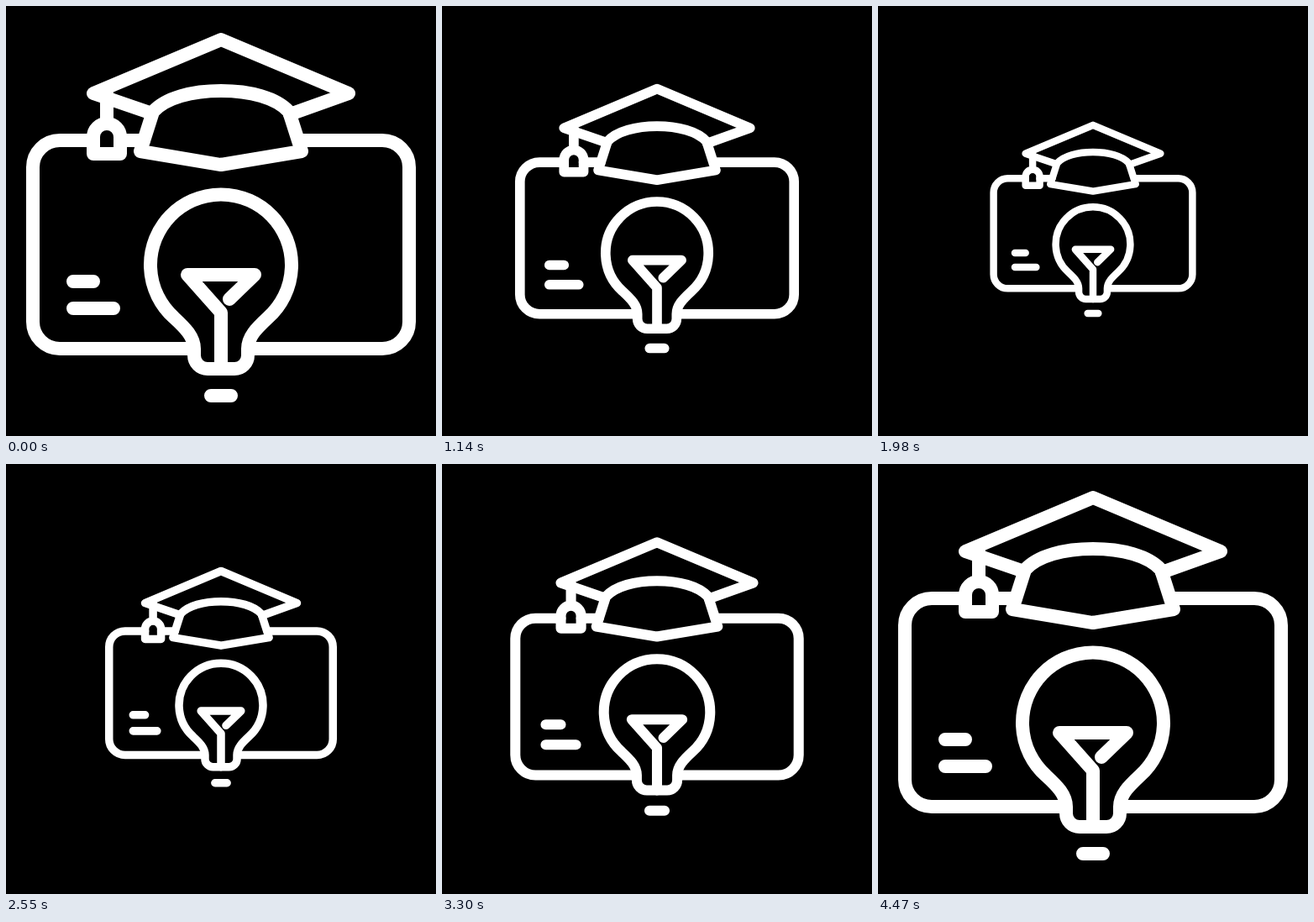
These frames come from a looping animation (512 px wide and 512 px high, 4.5 s). An HTML page:

```html
<!DOCTYPE html>
<html lang="en">
<head>
<meta charset="utf-8">
<title>Learning icon</title>
<style>
  html, body { margin: 0; width: 100%; height: 100%; overflow: hidden; background: #000; }
  svg { display: block; width: 100%; height: 100%; }
</style>
</head>
<body>
<svg viewBox="0 0 512 512">
  <g id="icon" fill="none" stroke="#fff" stroke-width="16" stroke-linecap="round" stroke-linejoin="round">
    <!-- card -->
    <path d="M104 160H64A32 32 0 0 0 32 192V376A32 32 0 0 0 64 408H224M288 408H448A32 32 0 0 0 480 376V192A32 32 0 0 0 448 160H349M136 160H164"/>
    <path d="M80 328H104M80 360H128"/>
    <!-- cap -->
    <path d="M174 128L104 104L256 40L408 104L338 129"/>
    <path d="M160 173L175 126C190 109 222 101 256 101S322 109 337 126L352 173L256 189Z"/>
    <!-- tassel -->
    <path d="M120 104V140M104 176V156A16 16 0 0 1 136 156V176Z"/>
    <!-- bulb -->
    <path d="M224 408C224 394 214 384 200 371A84 84 0 1 1 312 371C298 384 288 394 288 408V416A16 16 0 0 1 272 432H240A16 16 0 0 1 224 416Z" stroke="none" fill="#000"/>
    <path d="M200 371A84 84 0 1 1 312 371C298 384 288 394 288 408V416A16 16 0 0 1 272 432H240A16 16 0 0 1 224 416V408C224 394 214 384 200 371Z"/>
    <path d="M256 432V365L216 320H296L266 349M244 464H268"/>
  </g>
</svg>
<script>
  const LOOP = 4500, STEP = 30, TURN = 2100, END = 4470, MIN = 0.5;
  const icon = document.getElementById('icon');

  // Linear shrink to half size, then linear growth back.
  function scaleAt(t) {
    return t < TURN
      ? 1 - (1 - MIN) * t / TURN
      : Math.min(1, MIN + (1 - MIN) * (t - TURN) / (END - TURN));
  }

  const start = performance.now();
  function draw() {
    const elapsed = (performance.now() - start) % LOOP;
    const s = scaleAt(Math.floor(elapsed / STEP) * STEP);
    icon.setAttribute('transform', `translate(256 256) scale(${s}) translate(-256 -256)`);
    requestAnimationFrame(draw);
  }
  draw();
</script>
</body>
</html>
```
